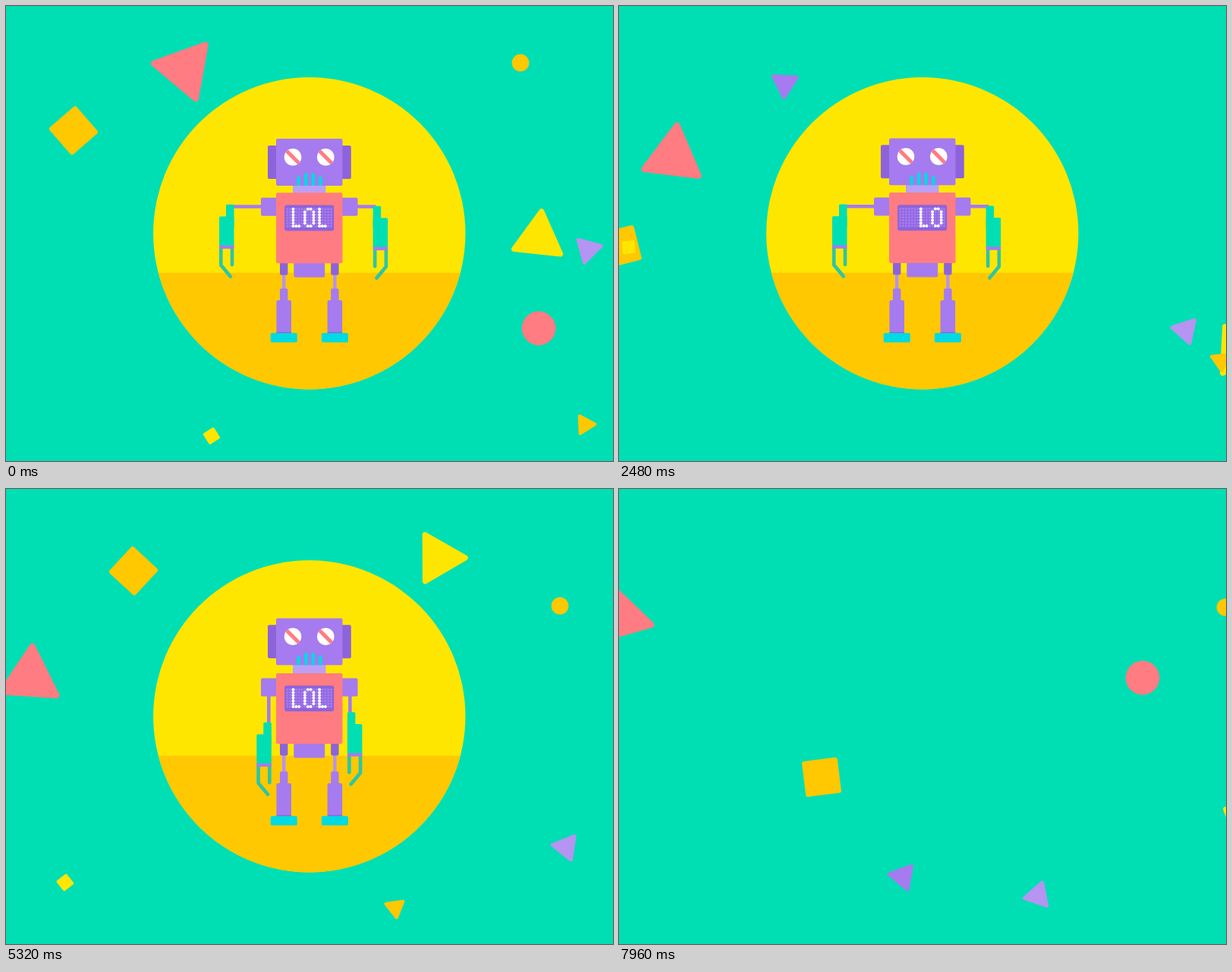
Animation, 800 px wide and 600 px high, one loop 8000 ms. Source, as an HTML page:

```html
<!DOCTYPE html>
<html lang="en">
<head>
<meta charset="utf-8">
<title>Robot</title>
<style>
html, body { margin: 0; width: 100%; height: 100%; overflow: hidden; background: #00deb4; }
svg { display: block; width: 100vw; height: 100vh; }
</style>
</head>
<body>
<svg id="stage" viewBox="0 0 800 600"></svg>
<script>
const LOOP = 8000;
const C = {
  mint: '#00deb4', yellow: '#ffe600', orange: '#ffc800', pink: '#ff7c82', purple: '#a57bef',
  dark: '#8d63dc', pale: '#b594f2', cyan: '#00dae2', hand: '#2cc6a6', white: '#ffffff'
};
const stage = document.getElementById('stage');

function add(parent, tag, attrs = {}) {
  const el = document.createElementNS('http://www.w3.org/2000/svg', tag);
  for (const k in attrs) el.setAttribute(k, attrs[k]);
  return parent.appendChild(el);
}
const group = parent => add(parent, 'g');
const box = (g, x, y, x2, y2, fill, rx = 0) =>
  add(g, 'rect', { x, y, width: x2 - x, height: y2 - y, fill, rx });
const move = (el, value) => el.setAttribute('transform', value);
const progress = (t, from, to) => Math.min(1, Math.max(0, (t - from) / (to - from)));
const ease = (t, from, to) => {
  const u = progress(t, from, to);
  return u * u * (3 - 2 * u);
};

// Smooth curve through the stops of a wandering shape
const TIMES = [0, 1640, 3320, 4520, 5320, 6800, 7960];
const LAST = TIMES.length - 1;
function wander(t, stops, axis) {
  if (t >= TIMES[LAST]) return stops[LAST][axis];
  const i = TIMES.findIndex((_, k) => t < TIMES[k + 1]);
  const slope = k => {
    const a = Math.max(k - 1, 0), b = Math.min(k + 1, LAST);
    return (stops[b][axis] - stops[a][axis]) / (TIMES[b] - TIMES[a]);
  };
  const h = TIMES[i + 1] - TIMES[i], u = (t - TIMES[i]) / h, w = 1 - u;
  return stops[i][axis] * (1 + 2 * u) * w * w + slope(i) * h * u * w * w
    + stops[i + 1][axis] * u * u * (3 - 2 * u) - slope(i + 1) * h * u * u * w;
}

// Confetti: every piece spins at one rate; null means waiting outside its side
const SPIN = .0834;
const away = null;
function piece(fill, sides, r, angle, path) {
  const home = path.find(Boolean);
  const edge = home[0] < 400 ? -40 : 840;
  let y = home[1];
  const stops = path.map(p => {
    if (p) y = p[1];
    return p || [edge, y];
  });
  if (!sides) return { el: add(stage, 'circle', { r, fill }), stops, angle };
  const round = 2.5 + r / 8;
  const points = Array.from({ length: sides }, (_, i) => {
    const a = i * 2 * Math.PI / sides;
    return `${(r * Math.cos(a)).toFixed(2)},${(r * Math.sin(a)).toFixed(2)}`;
  }).join(' ');
  const el = add(stage, 'polygon', {
    points, fill, stroke: fill, 'stroke-width': round, 'stroke-linejoin': 'round'
  });
  return { el, stops, angle };
}
const confetti = [
  piece(C.pink, 3, 41.7, 70,
    [[236, 83], [78, 160], [105, 210], [239, 82], [32, 249], [187, 212], [2, 169]]),
  piece(C.orange, 4, 29, 4,
    [[89, 164], [39, 415], [-15, 184], [88, 188], [168, 108], [90, 272], [267, 380]]),
  piece(C.yellow, 3, 35.5, 36,
    [[702, 306], [760, 431], away, [677, 220], [570, 91], [738, 236], [827, 445]]),
  piece(C.pale, 3, 18, 105,
    [[767, 321], [659, 415], away, [766, 324], [738, 472], [671, 555], [552, 536]]),
  piece(C.orange, 3, 13.3, 118,
    [[763, 552], [741, 478], away, [772, 555], [513, 552], [607, 504], away]),
  piece(C.yellow, 4, 9.5, 13,
    [[271, 567], [125, 348], away, [262, 567], [78, 519], [83, 308], away]),
  piece(C.purple, 3, 18, -114,
    [away, [170, 97], [205, 108], away, away, [166, 523], [374, 511]]),
  piece(C.orange, 0, 11.4, 0,
    [[678, 75], away, [772, 17], [671, 96], [730, 154], away, [799, 156]]),
  piece(C.pink, 0, 22.4, 0,
    [[702, 425], away, away, [707, 458], away, away, [690, 249]])
];

// Disc with its floor
const disc = group(stage);
const RADIUS = 205.7, FLOOR = 52;
const half = Math.sqrt(RADIUS ** 2 - FLOOR ** 2);
const wall = add(disc, 'circle', { r: RADIUS });
const floor = add(disc, 'path', { d: `M${-half} ${FLOOR}A${RADIUS} ${RADIUS} 0 0 0 ${half} ${FLOOR}Z` });

// Robot
const robot = group(stage);
const legs = group(robot), body = group(robot), head = group(robot), torso = group(robot);
for (const x of [366.2, 433.4]) {
  box(legs, x - 2.2, 340, x + 2.2, 375, C.pale);
  box(legs, x - 5.2, 372.5, x + 5.2, 392, C.purple, 2);
  box(legs, x - 9.8, 388, x + 9.8, 432, C.purple, 2);
  box(legs, x - 9.8, 430, x + 9.8, 432, C.dark);
  box(legs, x - 17.5, 431.3, x + 17.5, 443.6, C.cyan, 1.5);
  box(body, x - 5.2, 335, x + 5.2, 355, C.dark, 2);
}
box(body, 379.3, 335, 420.2, 358, C.purple, 2);

// Forearm drawn around its elbow; side mirrors it
const SHOULDER = 264.7;
function makeArm(pivot, elbow, top, side) {
  const bar = add(body, 'line', {
    x1: pivot, y1: SHOULDER, stroke: C.purple, 'stroke-width': 4.6
  });
  const fore = group(body);
  const g = add(fore, 'g', { transform: `translate(${elbow} ${top}) scale(${side} 1)` });
  for (const d of ['M13.7 57V80L1.2 95', 'M-1 57V79.5']) {
    add(g, 'path', {
      d, fill: 'none', stroke: C.hand, 'stroke-width': 4.6,
      'stroke-linecap': 'round', 'stroke-linejoin': 'round'
    });
  }
  box(g, -3.5, 0, 7, 30, C.mint, 1.5);
  box(g, -3.5, 15.7, 16, 56, C.mint, 1.5);
  box(g, -3.5, 54, 16, 58.3, C.purple);
  return { bar, fore, pivot, reach: elbow - pivot };
}
const arms = [makeArm(346.3, 297, 262, -1), makeArm(453.4, 487.2, 264, 1)];
box(body, 336, 253, 358, 277, C.purple, 2);
box(body, 441, 253, 463.5, 277, C.purple, 2);

box(head, 378, 230, 421.5, 252, '#bb9ff4');
box(head, 345, 184.3, 360, 228.3, C.dark, 2);
box(head, 440, 184.3, 454.8, 228.3, C.dark, 2);
box(head, 356, 175.5, 443.5, 237.3, C.purple, 2);
for (const x of [378, 421.3]) {
  const id = 'eye' + Math.floor(x);
  add(add(stage, 'clipPath', { id }), 'circle', { cx: x, cy: 199.6, r: 11.3 });
  add(head, 'circle', { cx: x, cy: 199.6, r: 11.3, fill: C.white });
  add(head, 'path', {
    d: `M${x - 11} 188.6l22 22`, stroke: C.pink, 'stroke-width': 5, 'clip-path': `url(#${id})`
  });
}
for (let i = 0; i < 4; i++) {
  const x = 383.4 + i * 9.6, y = i % 3 ? 222.7 : 227.2;
  add(head, 'path', { d: `M${x} 237.3V${y}a2.2 2.2 0 0 1 4.4 0V237.3Z`, fill: C.cyan });
}

box(torso, 356, 246.5, 443.5, 339.5, C.pink, 2);
box(torso, 367.2, 262.8, 432.2, 296.8, C.dark, 2.5);

// Dot display
const glyphs = {
  L: ['1..', '1..', '1..', '1..', '1..', '1..', '111'],
  O: ['.11.', '1..1', '1..1', '1..1', '1..1', '1..1', '.11.']
};
const rows = glyphs.L.map((_, r) => [...'LOL'].map(ch => glyphs[ch][r]).join('.'));
const lamps = [];
rows.forEach((_, r) => {
  for (let c = 0; c < 16; c++) {
    const x = 370.8 + c * 3.85, y = 268 + r * 3.75;
    box(torso, x - 1.45, y - 1.4, x + 1.45, y + 1.4, C.purple);
    lamps.push({ el: add(torso, 'circle', { cx: x, cy: y, r: 2, fill: C.white }), r, c });
  }
});

// The word runs past right to left, pausing briefly at each centre time
const CENTRES = [0, 2820, 5320, 7350];
function wordShift(t) {
  const gaps = CENTRES.map(c => c - t);
  const gap = gaps.reduce((a, b) => Math.abs(b) < Math.abs(a) ? b : a);
  return Math.sign(gap) * Math.round(Math.max(0, Math.abs(gap) - 100) / 50);
}

function poseArm({ bar, fore, pivot, reach }, angle) {
  const dx = reach * (Math.cos(angle) - 1), dy = Math.abs(reach) * Math.sin(angle);
  bar.setAttribute('x2', pivot + reach + dx);
  bar.setAttribute('y2', SHOULDER + dy);
  move(fore, `translate(${dx} ${dy})`);
}

function render(t) {
  for (const { el, stops, angle } of confetti) {
    move(el, `translate(${wander(t, stops, 0)} ${wander(t, stops, 1)}) rotate(${angle + SPIN * t})`);
  }

  // Exit: the disc swaps colours, turns and shrinks while the robot hops
  const exit = progress(t, 6640, 7156) ** 2;
  wall.setAttribute('fill', exit ? C.orange : C.yellow);
  floor.setAttribute('fill', exit ? C.yellow : C.orange);
  move(disc, `translate(399.8 299.8) rotate(${180 * exit}) scale(${1 - exit})`);
  const size = 1 - ease(t, 6810, 7156);
  move(robot, `translate(400 ${300 - 120 * exit}) scale(${size}) translate(-400 -300)`);

  // Bounce, then stand straight with the arms down
  const wave = lead => 1 - Math.cos(2 * Math.PI * (t / 840 + lead));
  const stand = ease(t, 4540, 4960);
  const mix = (a, b) => a + (b - a) * stand;
  const bob = mix(4.1 * wave(.06) - .5, 4.5 * ease(t, 5500, 6600) - 3.5);
  const nod = mix(2.6 * wave(.12) - .9, -1.5);
  move(body, `translate(0 ${bob})`);
  move(torso, `translate(0 ${bob})`);
  move(head, `translate(0 ${bob + nod})`);
  const drop = ease(t, 4600, 5080) * Math.PI / 2;
  for (const arm of arms) poseArm(arm, drop);

  const shift = wordShift(t);
  for (const { el, r, c } of lamps) {
    const on = rows[r][c - 2 - shift] === '1';
    el.setAttribute('visibility', on ? 'visible' : 'hidden');
  }
}

const start = performance.now();
function tick(now) {
  render(Math.max(0, now - start) % LOOP);
  requestAnimationFrame(tick);
}
render(0);
requestAnimationFrame(tick);
</script>
</body>
</html>
```
